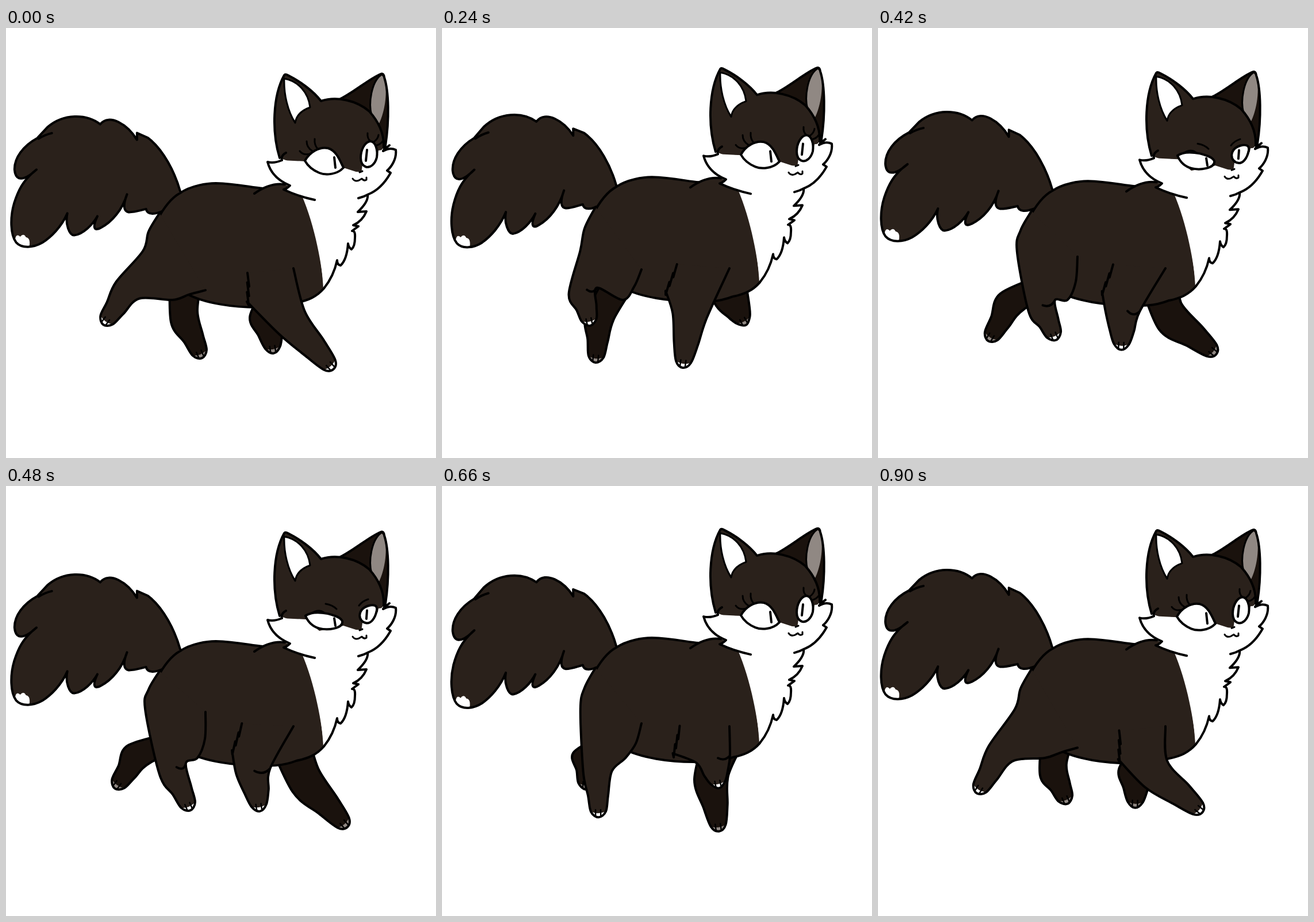
An HTML page for the animation above (960 ms loop, 748 by 748 pixels).

```html
<!DOCTYPE html>
<html>
<head>
<meta charset="utf-8">
<style>
html, body { margin: 0; width: 100%; height: 100%; overflow: hidden; background: #fff; }
svg { display: block; width: 100vw; height: 100vh; }
path { stroke-width: 4; stroke-linecap: round; stroke-linejoin: round; }
</style>
</head>
<body>
<svg id="stage" viewBox="0 0 748 748"></svg>
<script>
const FUR = '#2a211b', SHADE = '#1a120d', GREY = '#908883', WHITE = '#fff', INK = '#000';
const STEP = 60, STEPS = 16, TAU = Math.PI * 2;
const svg = document.getElementById('stage');

function add(parent, tag, attrs) {
  const node = document.createElementNS('http://www.w3.org/2000/svg', tag);
  for (const k in attrs) node.setAttribute(k, attrs[k]);
  return parent.appendChild(node);
}
const shape = (parent, fill, d = '') => add(parent, 'path', { d, fill });
const line = (parent, d = '', width = 4) =>
  add(parent, 'path', { d, fill: 'none', stroke: INK, style: `stroke-width:${width}` });

// ---- geometry helpers ----
const lerp = (a, b, k) => a + (b - a) * k;
const mix = (a, b, k) => a.map((v, i) => lerp(v, b[i], k));
const move = (p, dir, len) => p.map((v, i) => v + dir[i] * len);
const nums = s => s.match(/-?[\d.]+/g).map(Number);
const warp = (d, fn) => d.replace(/(-?[\d.]+),(-?[\d.]+)/g, (m, x, y) => fn(+x, +y).map(v => v.toFixed(1)).join());
function morph(from, to, k) {
  const a = nums(from), b = nums(to);
  let i = 0;
  return from.replace(/-?[\d.]+/g, () => lerp(a[i], b[i++], k).toFixed(1));
}

// smooth curve through points; the first `sharp` segments stay straight
function curve(p, sharp) {
  let d = 'M' + p[0];
  for (let i = 0; i < p.length - 1; i++) {
    const b = p[i], c = p[i + 1];
    if (i < sharp) { d += 'L' + c; continue; }
    const a = i > sharp ? p[i - 1] : b, e = p[i + 2] || c;
    d += 'C' + [...b.map((v, j) => v + (c[j] - a[j]) / 6), ...c.map((v, j) => v - (e[j] - b[j]) / 6), ...c];
  }
  return d;
}

// closed smooth track of evenly timed points, sampled by walk phase
function track(text) {
  const pts = text.split(' ').map(nums), len = pts.length;
  return phase => {
    const t = phase / STEPS * len, i = Math.floor(t), k = t - i;
    const [a, b, c, d] = [-1, 0, 1, 2].map(o => pts[(i + o + len) % len]);
    return b.map((v, j) => v + k / 2 * (c[j] - a[j] + k * (2 * a[j] - 5 * v + 4 * c[j] - d[j] +
      k * (3 * (v - c[j]) + d[j] - a[j]))));
  };
}

// ---- legs: a knee and a foot follow tracks, the far pair half a walk later ----
const HIND = {
  wide: 25, bendAt: 2, sharp: 0, shift: [20, 10], hip: [[285, 430], [340, 440]],
  knee: track('212,456 225,455 245,457 275,473 290,492 283,498 255,492 222,476'),
  foot: track('175,508 205,508 256,508 288,513 317,555 292,567 248,562 190,546'),
  join(foot, dy) {
    const s = (foot[0] - 245) / 72;
    return [[[267, 322 + dy], [248, 354 + dy / 2], [240 + 2 * s, 388]],
      [[311 + 22 * s, 473], [332 + 14 * s, 452 - 12 * s], [347, 425 - 32 * s]]];
  }
};
const FORE = {
  wide: 30, bendAt: 5, sharp: 6, shift: [24, 0], hip: [[455, 440], [528, 440]],
  knee: track('497,512 462,512 431,500 425,488 430,496 458,484 480,470 468,488'),
  foot: track('563,586 500,595 420,581 411,545 440,556 462,530 500,508 538,534'),
  join(foot) {
    const s = (foot[0] - 487) / 76;
    const top = [414 + 6 * s, 418 + 8 * s], elbow = [403 + 16 * s, 466 + 10 * s];
    const fluff = [top];
    for (let i = 1; i <= 3; i++) {
      const from = mix(top, elbow, (i - 1) / 3), to = mix(top, elbow, i / 3);
      fluff.push([Math.max(from[0], to[0]) - 2 + 5 * s, to[1] + 7], to);
    }
    return [fluff, [[500, 418]]];
  }
};

function limb(kind, far) {
  const skin = shape(svg, far ? SHADE : FUR), tip = shape(svg, far ? GREY : WHITE);
  const edge = line(svg), claws = line(svg, '', 2.5);
  return (step, dy) => {
    const phase = (step + (far ? STEPS / 2 : 0)) % STEPS;
    let knee = kind.knee(phase), foot = kind.foot(phase);
    if (far) [knee, foot] = [knee, foot].map(p => move(p, kind.shift, 1));
    const [before, after] = far ? kind.hip.map(p => [p]) : kind.join(foot, dy);

    const len = Math.hypot(foot[0] - knee[0], foot[1] - knee[1]);
    const dir = knee.map((v, i) => (foot[i] - v) / len), side = [dir[1], -dir[0]];
    const at = (k, w) => move(mix(knee, foot, k), side, w);
    const heel = at(1, -13), end = move(foot, dir, 10), toe = at(1, 13), front = at(0, kind.wide);
    const d = curve([...before, at(0, -kind.wide), at(.6, -kind.wide * .7), heel, end, toe,
      at(.6, kind.wide * .7), front, ...after], far ? 0 : kind.sharp);
    skin.setAttribute('d', d + 'Z');

    const bend = far ? 0 : Math.max(0, Math.sin((phase - kind.bendAt) / STEPS * TAU));
    const fold = bend > .2 ? `M${front}Q${move(at(.15, kind.wide * (1 - .5 * bend)), dir, 2)} ${at(0, kind.wide * (1 - bend))}` : '';
    edge.setAttribute('d', d + fold);

    const out = move(foot, dir, 20);
    tip.setAttribute('d', `M${heel}Q${out} ${toe}Q${move(foot, dir, 6)} ${heel}`);
    claws.setAttribute('d', [-5, 4].map(w => `M${move(at(1, w), dir, 8)}L${move(at(1, w), dir, -3)}`).join(''));
  };
}

// ---- tail ----
const TAIL = 'M303,284 C294,252 274,212 247,192 L228,184 L228,196 C212,170 180,150 164,170 C140,152 100,152 72,177 L55,196' +
  ' C30,210 15,232 16,252 C18,272 32,272 54,251 C30,270 22,290 16,310 C9,335 10,365 20,378 C30,389 50,387 65,378' +
  ' C80,368 98,350 108,326 C104,345 112,364 120,364 C135,362 152,345 160,330 C150,352 156,356 166,350' +
  ' C185,340 203,318 211,291 C203,312 206,321 214,322 C225,322 235,318 244,316 C246,326 258,326 275,318';
const TUFT = 'M80,187 Q68,190 57,197';
const TAIL_TIP = 'M18,374 Q20,361 27,368 Q33,361 37,369 Q45,370 43,384 Q28,389 18,374Z';
const tailFill = shape(svg, FUR), tailTip = shape(svg, WHITE), tailLine = line(svg);

const farLegs = [limb(HIND, true), limb(FORE, true)];

// ---- body ----
const body = add(svg, 'g', {});
const BACK = 'M262,336 C275,311 290,294 303,287 C322,274 350,270 365,270 C400,271 425,277 447,279';
const BELLY = ' C540,468 525,474 505,478 C480,488 455,487 437,486 C400,486 345,480 312,461';
const RUFF = 'M629,290 Q631,302 612,320 L627,319 Q620,336 604,343 L613,345 L602,353 Q608,352 607,365 Q607,380 601,385' +
  ' Q596,382 595,375 Q593,403 582,413 Q576,412 576,404 Q570,432 553,453';
shape(body, FUR, BACK + ' C460,273 470,271 485,272 L519,290 C540,350 550,410 552,453' + BELLY + ' C288,445 266,410 264,380Z');
shape(body, WHITE, RUFF + ' C550,415 538,345 514,290 L540,280Z');
line(body, BACK);
line(body, 'M432,288 C446,278 464,269 485,272');
line(body, RUFF + BELLY);

const nearLegs = [limb(HIND, false), limb(FORE, false)];

// ---- head ----
const head = add(svg, 'g', {});
const FAR_EAR = 'M582,123 C605,112 632,88 652,80 Q657,78 658,86 C666,110 667,160 660,205';
const SKULL = 'M476,226 C462,180 464,118 484,82 Q486,79 492,83 C512,93 535,110 548,127 C575,118 610,126 632,145 C650,165 658,185 657,208';
const CHEEK_L = 'M480,230 Q466,236 455,233 C460,252 474,266 494,274 Q488,280 483,281 C500,289 518,295 537,299';
const CHEEK_R = 'M656,214 Q668,207 678,212 C680,228 670,242 663,248 L669,252 C660,268 648,282 631,289 Q622,294 613,296';
shape(head, SHADE, FAR_EAR + 'Z');
shape(head, GREY, 'M652,82 C636,94 630,130 636,152 L648,168 C660,145 664,108 658,86Z');
line(head, 'M652,82 C636,94 630,130 636,152', 3);
shape(head, FUR, SKULL + ' L619,250 L545,252Z');
line(head, FAR_EAR);
shape(head, WHITE, CHEEK_L + ' L613,296 L631,289 C648,282 660,268 669,252 L663,248 C670,242 680,228 678,212' +
  ' Q668,207 656,212 L648,213 L645,228 L632,241 L620,238 L618,253 L587,243 L545,252 L522,232Z');
line(head, SKULL);
add(head, 'path', { d: 'M484,88 C508,92 526,112 529,138 Q506,146 503,165 C490,145 483,115 484,88Z', fill: WHITE, stroke: INK, style: 'stroke-width:3' });
line(head, CHEEK_L + 'M487,217 Q478,222 480,230');
line(head, CHEEK_R + 'M658,203 Q660,210 656,214 M667,204 L658,211');
line(head, 'M603,262 Q607,268 614,265 L619,262 Q623,267 627,264 L627,260', 3);
line(head, 'M615,251 L620,249', 3);

const EYES = [
  ['M520,231 C528,216 545,206 560,209 C574,213 580,228 587,243 C575,256 555,256 545,252 C533,247 525,240 520,231Z',
   'M521,225 C530,220 545,221 560,224 C572,227 584,229 585,235 C587,247 560,251 545,247 C533,244 525,235 521,225Z'],
  ['M617,226 C617,212 624,198 634,197 C643,198 647,212 645,225 C642,237 634,243 627,242 C620,240 617,233 617,226Z',
   'M615,225 C616,215 624,211 634,209 C640,208 646,207 645,215 C642,231 634,239 627,238 C620,237 615,232 615,225Z']
];
const eyes = EYES.map(() => add(head, 'path', { fill: WHITE, stroke: INK }));
const pupils = line(head);
const lashes = line(head, 'M529,219 Q517,222 511,214 M533,214 Q523,208 523,197 M542,210 Q536,203 537,193' +
  ' M634,197 Q628,192 629,183 M640,198 Q647,193 648,186 M645,204 Q652,202 655,197', 3);
const brows = line(head, 'M556,205 Q568,207 575,214 M614,208 Q620,200 630,197 M530,222 Q544,213 553,220', 3);

function draw(ms) {
  const step = Math.floor(ms / STEP) % STEPS;
  // two bobs per walk, rising slowly and dropping fast
  const beat = Math.pow(step % 8 / 8, 1.475) * TAU;
  const dy = -6.5 * (1 - Math.cos(beat));
  const lift = 9 * Math.cos(beat - .3 * TAU) - 2, curl = .7 * lift + 1;
  const open = Math.min(1, .1 + ((step - 7.5) / 3.2) ** 2);

  const sway = (x, y) => {
    const u = (303 - x) / 260;
    return [x + curl * u * (y - 150) / 236, y + dy + lift * u];
  };
  const d = warp(TAIL, sway);
  tailFill.setAttribute('d', d);
  tailTip.setAttribute('d', warp(TAIL_TIP, sway));
  tailLine.setAttribute('d', d + warp(TUFT, sway));

  for (const leg of [...farLegs, ...nearLegs]) leg(step, dy);
  for (const g of [body, head]) g.setAttribute('transform', `translate(0 ${dy})`);

  eyes.forEach((eye, i) => eye.setAttribute('d', morph(EYES[i][1], EYES[i][0], open)));
  pupils.setAttribute('d', morph('M571,231 L573,243 M628,217 L627,231', 'M571,225 L573,243 M628,212 L626,231', open));
  lashes.setAttribute('transform', `translate(0 ${(1 - open) * 10})`);
  lashes.setAttribute('opacity', open > .2 ? 1 : 0);
  brows.setAttribute('opacity', open > .2 ? 0 : 1);
}

function tick() {
  draw(performance.now());
  requestAnimationFrame(tick);
}
tick();
</script>
</body>
</html>
```
